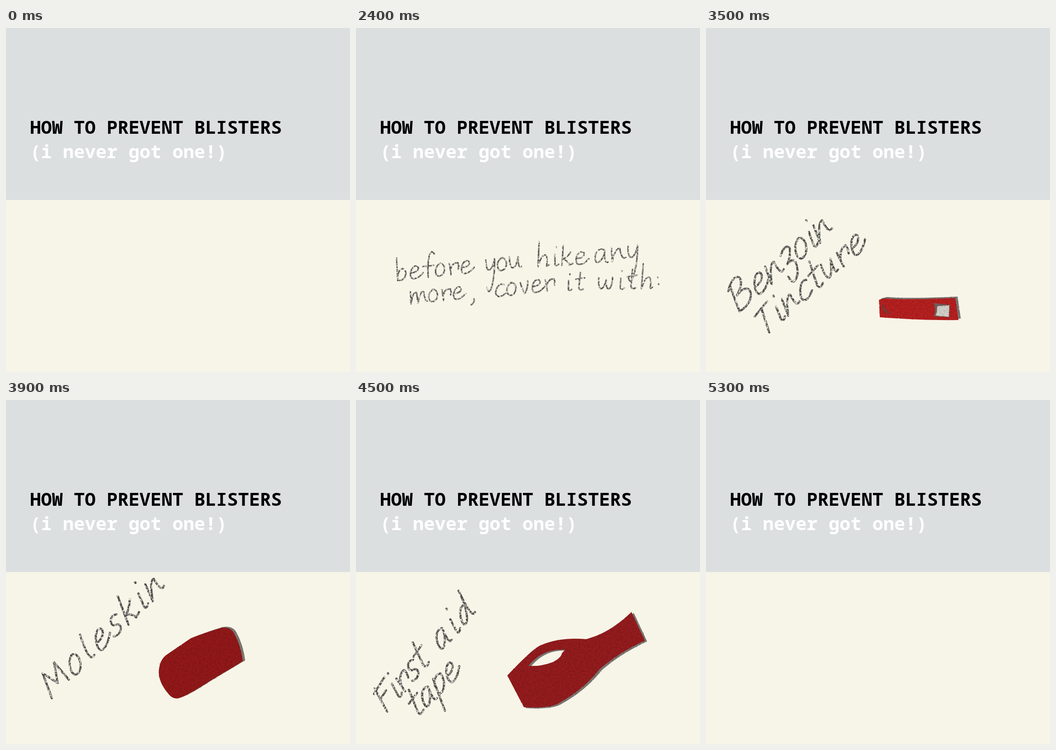
An HTML page that plays this animation: 748 by 748 pixels, repeating every 5.5 s.

```html
<!DOCTYPE html>
<html lang="en">
<head>
<meta charset="utf-8">
<title>How to prevent blisters</title>
<style>
  html, body { margin: 0; height: 100%; overflow: hidden; background: #f7f5e8; }
  svg { display: block; width: 100vw; height: 100vh; }
  text { font: 600 39.7px "Noto Sans Mono", monospace; white-space: pre; }
  .pencil { fill: none; stroke-linecap: round; stroke-linejoin: round; filter: url(#pencil); }
  .pencil path { vector-effect: non-scaling-stroke; }
  .paper { filter: url(#paper); fill-rule: evenodd; }
</style>
</head>
<body>
<svg viewBox="0 0 748 748">
  <defs>
    <filter id="pencil" filterUnits="userSpaceOnUse" x="0" y="374" width="748" height="374" color-interpolation-filters="sRGB">
      <feTurbulence type="fractalNoise" baseFrequency=".25" numOctaves="3" seed="4"/>
      <feColorMatrix values="0 0 0 0 0  0 0 0 0 0  0 0 0 0 0  0 0 0 2.8 -.7" result="grain"/>
      <feComposite in="SourceGraphic" in2="grain" operator="in"/>
    </filter>
    <filter id="paper" filterUnits="userSpaceOnUse" x="0" y="374" width="748" height="374" color-interpolation-filters="sRGB">
      <feTurbulence type="fractalNoise" baseFrequency=".25" numOctaves="3" seed="2" result="noise"/>
      <feDisplacementMap in="SourceGraphic" in2="noise" scale="2" xChannelSelector="R" yChannelSelector="G" result="cut"/>
      <feColorMatrix in="noise" values="0 0 0 0 0  0 0 0 0 0  0 0 0 0 0  0 0 0 .3 -.1"/>
      <feComposite in2="cut" operator="in" result="fibre"/>
      <feMerge><feMergeNode in="cut"/><feMergeNode in="fibre"/></feMerge>
    </filter>
  </defs>
  <rect width="748" height="374" fill="#dbdfe0"/>
  <text x="52.2" y="230">HOW TO PREVENT BLISTERS</text>
  <text x="52.2" y="282.5" fill="#fff">(i never got one!)</text>
</svg>
<script>
const LOOP = 5500, STEP = 200;

// Stroke alphabet: [advance, path], baseline at 0, x-height 10
const glyphs = {
  a: [10, "M8-9C3-12 0-6 1-2C2 2 8-3 8-9Q7 1 10 0"],
  b: [9, "M1-18L1 0Q1-8 5-9C10-8 8 2 1 0"],
  c: [8, "M8-9C4-12 0-5 1-2Q3 2 9-2"],
  d: [10, "M8-8C3-12 0-4 1-1C4 2 8-6 8-17Q7 1 11-1"],
  e: [9, "M1-5C8-4 9-10 5-10C0-9-1 1 4 0Q7 0 11-4"],
  f: [8, "M10-18C7-24 4-16 4 0M0-9H9"],
  h: [10, "M2-20L1 0Q4-10 7-9Q9-8 8 0L10-1"],
  i: [4, "M2-9V-1Q3 1 5-1M3-15v.5"],
  k: [9, "M2-16L1 0M8-10Q5-6 2-5Q6-3 7 0L10-1"],
  l: [5, "M2-15Q0 1 5-1"],
  m: [14, "M1-10V0Q3-10 6-9L7 0Q9-10 12-9Q13 0 15-1"],
  n: [10, "M1-10V0Q4-10 7-9Q8 0 11-2"],
  o: [9, "M5-10C-1-9-1 1 4 0C9-1 9-10 4-10"],
  p: [9, "M2-10L0 9M1-6Q4-12 8-9C9-3 5 1 1-1"],
  r: [8, "M1-9L2 0M2-5Q4-10 8-9Q9-7 8-4"],
  s: [7, "M7-9C2-12 0-6 4-5C9-3 5 2 0-1"],
  t: [7, "M4-16L3-2Q4 1 7-1M0-10L8-11"],
  u: [10, "M1-10C0 2 5 2 8-9Q7 1 10-1"],
  v: [8, "M1-9Q2-4 4 0Q7-4 7-10"],
  w: [13, "M1-10C0 2 5 1 7-8C6 2 12 2 12-10"],
  y: [9, "M1-10C0 1 5 1 8-10C7 8 1 22 0 12"],
  z: [9, "M1-9Q6-13 8-9Q6-4 3-3Q11-4 7 5Q2 10 1 3"],
  B: [13, "M1-15V0M-1-13C6-21 14-13 3-8C14-11 15 2 1 0"],
  F: [10, "M2-15V0M0-13L11-15M2-8L8-9"],
  L: [12, "M5-20L0 0Q6-2 12-3"],
  M: [15, "M1 0L2-14L8-4L11-14L15-1"],
  T: [11, "M6-14L5 0M0-13L11-15"],
  ",": [3, "M2-2Q3 1 0 3"],
  ":": [3, "M1-8v.5M2-2v.5"],
};

const svg = document.querySelector("svg");
const items = [];

function show(from, to, html, moves = [[0, 0]]) {
  svg.insertAdjacentHTML("beforeend", `<g>${html}</g>`);
  items.push({ el: svg.lastElementChild, from, to, moves });
}

// Letters spread along the baseline from (x0, y0) to (x1, y1)
function word(text, x0, y0, x1, y1, size, slant) {
  const letters = [...text].map(c => glyphs[c]);
  const ink = letters.reduce((sum, [width]) => sum + width * size, 0);
  const gap = (Math.hypot(x1 - x0, y1 - y0) - ink) / (letters.length - 1);
  const angle = Math.atan2(y1 - y0, x1 - x0) * 180 / Math.PI;
  let x = 0;
  return letters.map(([width, d]) => {
    const place = `translate(${x0} ${y0}) rotate(${angle}) translate(${x}) skewX(${-slant}) scale(${size})`;
    x += width * size + gap;
    return `<path d="${d}" transform="${place}"/>`;
  }).join("");
}

function note(from, to, { color, line, slant }, words, extra = "") {
  const ink = words.map(w => word(...w, slant)).join("");
  show(from, to, `<g class="pencil" stroke="${color}" stroke-width="${line}">${ink}</g>${extra}`);
}

function cutout(from, to, { d, color, shadow, detail = "" }, moves) {
  show(from, to, `<g class="paper">
    <path d="${d}" fill="#7f7a76" transform="translate(${shadow})"/>
    <path d="${d}" fill="${color}"/>${detail}</g>`, moves);
}

const fine = { color: "#5a5a57", line: 2.6, slant: 12 };
const soft = { color: "#545452", line: 3.4, slant: 3 };
const bold = { color: "#484846", line: 4.8, slant: 20 };

note(500, 2400, fine, [
  ["Look", 104, 525, 213, 515, 2.4],
  ["out", 241, 507, 311, 502, 2.2],
  ["for", 328, 504, 396, 498, 2.2],
  ["hot", 433, 492, 504, 489, 2],
  ["spots", 528, 491, 643, 488, 2.2],
]);
note(1200, 2400, fine, [
  ["places", 142, 586, 286, 578, 2],
  ["where", 314, 581, 423, 579, 1.8],
  ["the", 445, 582, 501, 582, 1.8],
  ["skin", 521, 585, 614, 583, 1.9],
  ["is", 151, 632, 186, 631, 1.9],
  ["red", 213, 635, 290, 628, 1.8],
  ["or", 321, 629, 350, 628, 1.7],
  ["warm", 376, 629, 488, 628, 1.9],
  ["from", 499, 631, 596, 628, 1.8],
  ["friction", 150, 682, 326, 678, 1.8],
], `<g fill="#2d3032"><text x="99.5" y="602">(</text><text x="326" y="683">)</text></g>`);
note(2400, 3100, soft, [
  ["before", 88, 549, 252, 532, 2.7],
  ["you", 282, 532, 360, 521, 2.7],
  ["hike", 393, 519, 501, 513, 2.7],
  ["any", 518, 512, 617, 502, 3],
  ["more", 117, 600, 234, 588, 2.6],
  [",", 251, 594, 251, 594, 2.6],
  ["cover", 302, 585, 432, 570, 2.7],
  ["it", 457, 571, 494, 570, 2.4],
  ["with", 525, 570, 645, 566, 2.7],
  [":", 653, 561, 653, 561, 2.4],
]);
note(3100, 3900, bold, [
  ["Benzoin", 70, 619, 274, 445, 3.8],
  ["Tincture", 124, 674, 346, 478, 3.6],
]);
note(3900, 4500, bold, [["Moleskin", 97, 651, 344, 414, 3.8]]);
note(4500, 5300, bold, [
  ["First", 63, 683, 160, 573, 3.6],
  ["aid", 184, 548, 258, 467, 3.6],
  ["tape", 131, 694, 226, 597, 3.5],
]);

cutout(3100, 3900, {
  d: "M376 586L388 583Q440 587 542 582L549 630Q470 631 378 624Z",
  color: "#b92020", shadow: "5 -3",
  detail: `<path d="M494 593L530 597L529 624L495 622Q502 608 494 593Z" fill="#75605b"/>
    <path d="M502 600L529 598L528 623L499 620Q504 610 502 600Z" fill="#d6d3cc"/>
    <path d="M384 592Q387 607 402 618L389 613Q381 604 384 592Z" fill="#74403d"/>`,
}, [[0, 0], [0, -26], [0, 5]]);
cutout(3900, 4500, {
  d: "M333 583Q336 562 352 552L402 518Q430 507 465 496Q485 492 494 504Q510 530 515 568L440 613Q395 643 374 649Q362 650 354 640Q328 610 333 583Z",
  color: "#941919", shadow: "5 -2",
}, [[0, 0], [48, 27], [-42, 10]]);
cutout(4500, 5300, {
  d: "M329 599Q380 545 398 535Q440 515 500 520Q550 508 599 461L628 523Q570 550 530 585Q495 630 440 660Q420 671 365 668ZM375 578Q402 545 440 543L455 543L448 550Q446 562 425 571Q400 580 375 578Z",
  color: "#961c1e", shadow: "5 2",
}, [[0, 0], [0, 41], [46, -34]]);

function draw() {
  const t = performance.now() % LOOP;
  for (const { el, from, to, moves } of items) {
    const on = t >= from && t < to;
    el.style.display = on ? "" : "none";
    if (!on) continue;
    const step = Math.min(Math.floor((t - from) / STEP), moves.length - 1);
    el.setAttribute("transform", `translate(${moves[step]})`);
  }
  requestAnimationFrame(draw);
}
draw();
</script>
</body>
</html>
```
